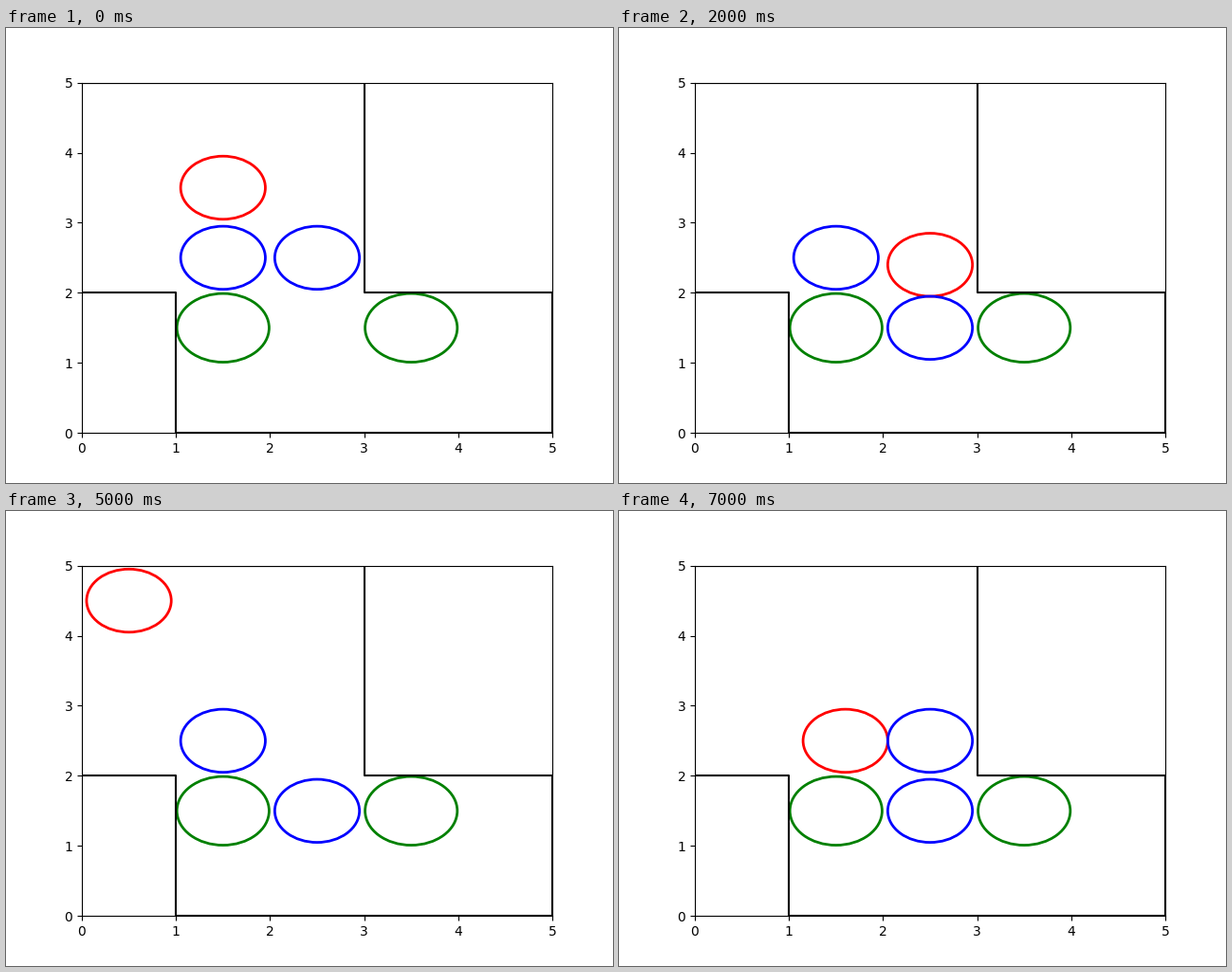
These frames come from a looping animation (640x480 px, 8 s). A matplotlib script:

```python
import numpy as np
import matplotlib.pyplot as plt
from matplotlib.animation import FuncAnimation

WALLS = [(0, 5), (0, 2), (1, 2), (1, 0), (5, 0), (5, 2), (3, 2), (3, 5), (0, 5)]
GOALS = [(1, 1), (3, 1)]
BALLS = [(1, 2), (2, 2)]

# The player visits these cells, leaning towards a ball to push it.
REST, DOWN, RIGHT = (0, 0), (0, -1), (1, 0)
PLAN = [((1, 3), REST), ((2, 3), DOWN), ((2, 2), DOWN), ((2, 2), REST),
        ((2, 4), REST), ((0, 4), REST), ((0, 2), RIGHT), ((1, 2), RIGHT)]


def center(cell):
    return np.array(cell) + 0.5


def positions(step):
    """Player and ball centers after all pushes up to this step."""
    balls = np.array(BALLS)
    for cell, lean in PLAN[:step + 1]:
        pushed = (balls == cell).all(axis=1)
        balls[pushed] += lean
    return [center(cell) + 0.1 * np.array(lean), *center(balls)]


fig, ax = plt.subplots(figsize=(6.4, 4.8), dpi=100)
ax.set_xlim(0, 5)
ax.set_ylim(0, 5)
ax.plot(*zip(*WALLS), color="black", lw=1.5)


def ring(xy, radius, color):
    return ax.add_patch(plt.Circle(xy, radius, color=color, fill=False, lw=2))


movers = [ring(xy, 0.45, color)
          for xy, color in zip(positions(0), ("red", "blue", "blue"))]
for goal in GOALS:
    ring(center(goal), 0.49, "green")


def update(step):
    for mover, xy in zip(movers, positions(step)):
        mover.center = xy
    return movers


anim = FuncAnimation(fig, update, frames=len(PLAN), interval=1000, repeat=True)
plt.show()
```
